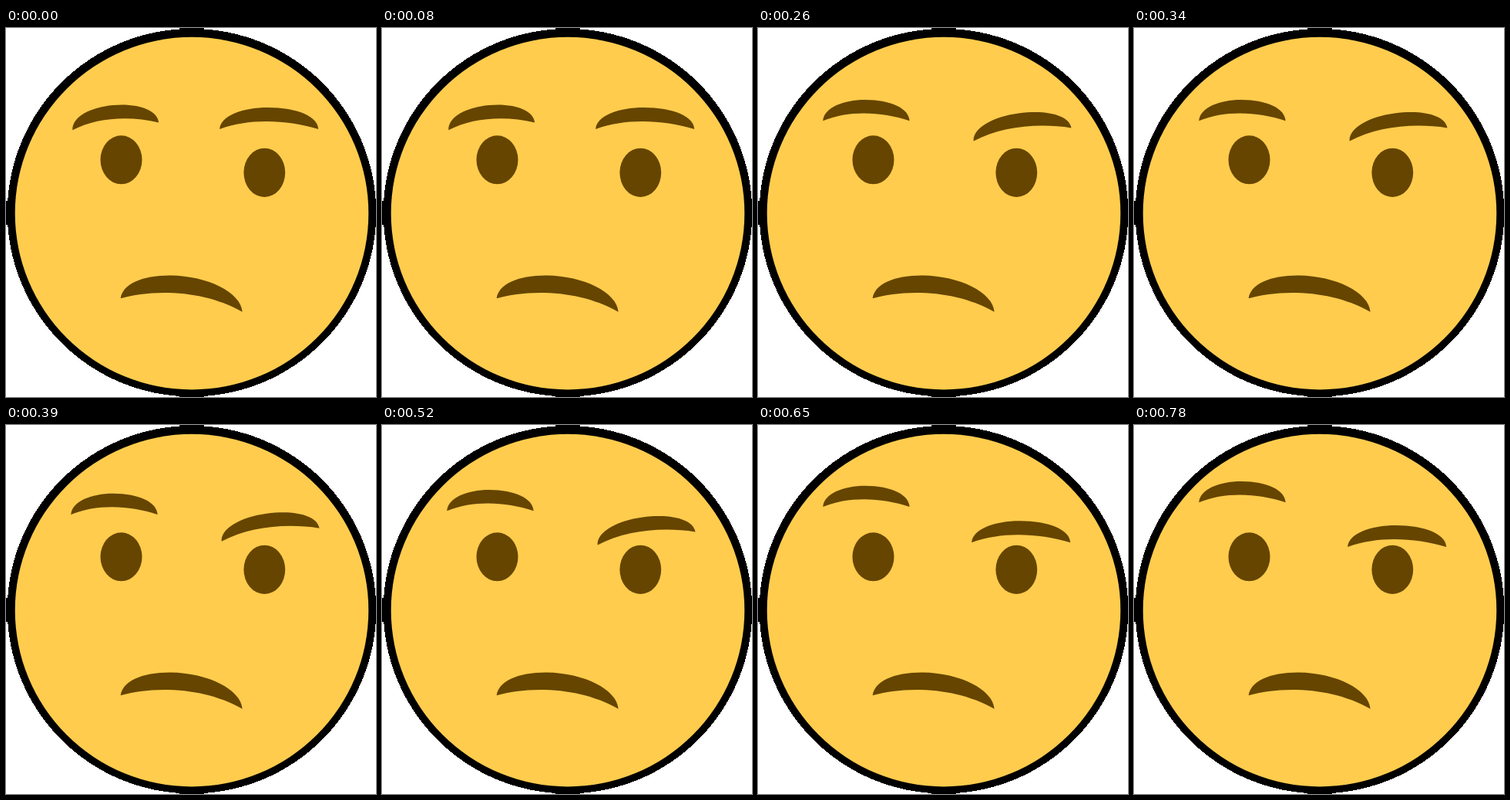
Animation, 480 px wide and 478 px high, one loop 910 ms. Source, as an HTML page:

```html
<!DOCTYPE html>
<html lang="en">
<head>
<meta charset="utf-8">
<title>Doubtful face</title>
<style>
  html, body { margin: 0; height: 100%; overflow: hidden; background: #fff; }
  svg { display: block; }
</style>
</head>
<body>
<svg width="480" height="478" viewBox="0 0 480 478" fill="#664500">
  <defs>
    <path id="brow" d="M-56 0C-55-17-30-27.4-1-27.4C32-27.4 56-16 56.3 0C20-12-22-14-56 0Z"/>
  </defs>
  <g fill="#000" shape-rendering="crispEdges">
    <ellipse cx="241" cy="239.2" rx="239.3" ry="238.3"/>
    <path d="M0 224h5v31h-5zM225 0h32v478h-32z"/>
  </g>
  <ellipse cx="241" cy="240.1" rx="229.3" ry="228.3" fill="#ffcc4d"/>
  <ellipse cx="149.5" cy="170.8" rx="27" ry="31.5"/>
  <ellipse cx="335.3" cy="187.3" rx="26.9" ry="31.6"/>
  <path d="M148.7 350.3C151 332 176 320.6 213 320.6C262 321 305 343 306.6 367.7C275 350 240 343 205 343C183 343 165 346 148.7 350.3Z"/>
  <use id="left" href="#brow"/>
  <use id="right" href="#brow"/>
</svg>
<script>
const STEP = 130, POSES = 7;
const [left, right] = ['left', 'right'].map(id => document.getElementById(id));

function place(brow, x, y, tilt, scale) {
  brow.setAttribute('transform', `translate(${x} ${y}) rotate(${tilt}) scale(${scale})`);
}

function draw() {
  const pose = Math.floor(performance.now() / STEP) % POSES;
  const travel = 3 * pose + pose ** 2 / 4; // the brows part at a growing speed
  const turn = Math.min(pose, 2);
  const leftTilt = 2.5 * turn - 5;
  const rightTilt = pose < 5 ? -3.85 * turn : 0; // snaps level near the end
  place(left, 140.3 - leftTilt * 0.35, 127.3 - travel, leftTilt, '1');
  place(right, 341 - rightTilt / 4, 131 + travel, rightTilt, '1.14 1.02');
  requestAnimationFrame(draw);
}
draw();
</script>
</body>
</html>
```
